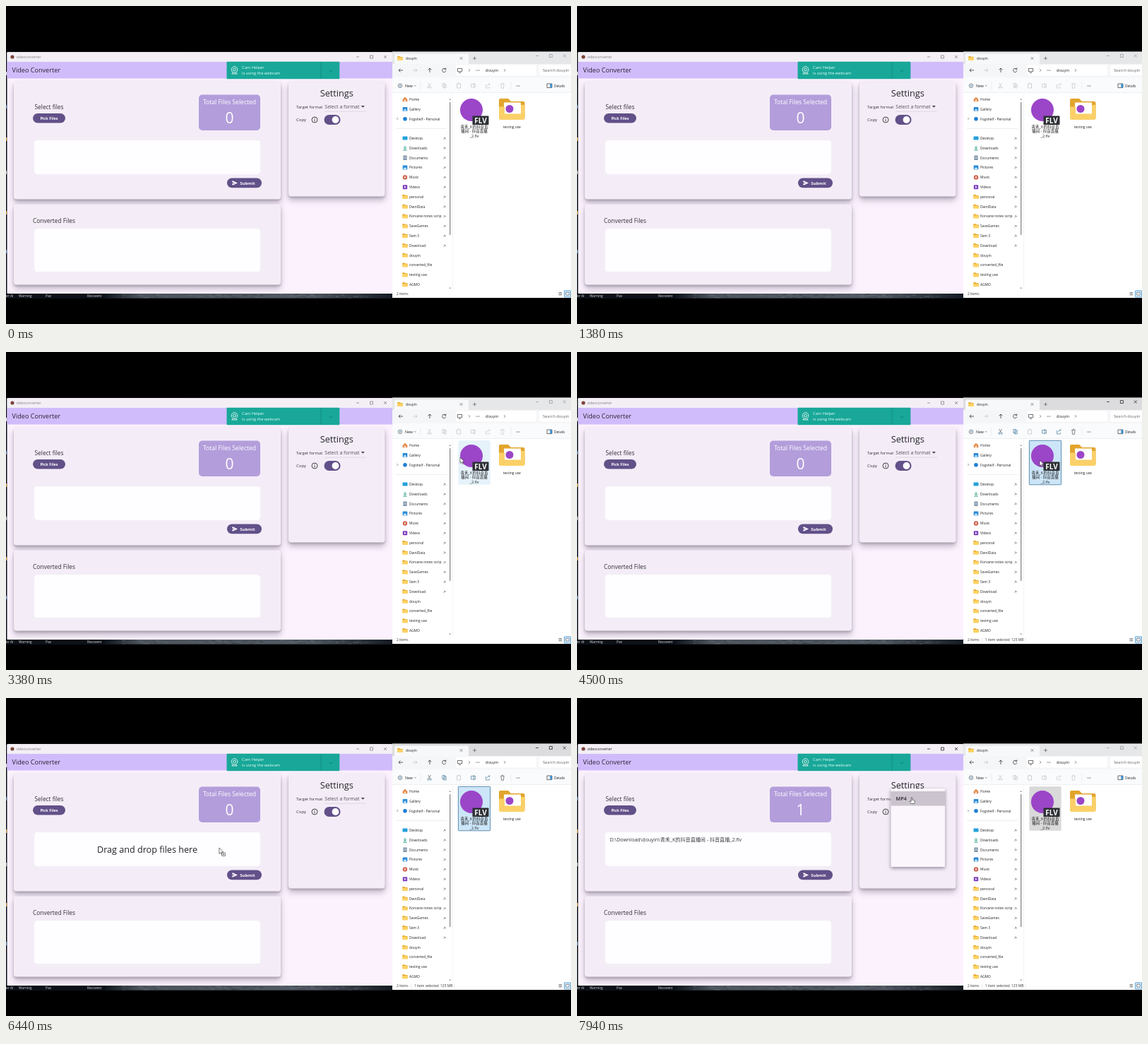
An HTML page for the animation above (8000 ms loop, 800 by 450 pixels).

```html
<!DOCTYPE html>
<html lang="en">
<head>
<meta charset="utf-8">
<title>Video Converter</title>
<style>
html, body { margin: 0; width: 100%; height: 100%; overflow: hidden; background: #000; }
svg { display: block; width: 100vw; height: 100vh; }
text { font-family: 'Open Sans', 'Noto Sans', 'Noto Sans CJK SC', 'Noto Sans CJK JP', 'Noto Sans CJK', sans-serif; white-space: pre; }
.card { filter: drop-shadow(0 2px 1.5px rgba(60, 50, 70, .26)) drop-shadow(0 5px 4px rgba(60, 50, 70, .3)); }
.field { filter: drop-shadow(0 .6px .6px rgba(70, 55, 85, .22)); }
.menu { filter: drop-shadow(0 2px 2.5px rgba(50, 40, 60, .5)); }
</style>
</head>
<body>
<svg id="stage" viewBox="0 0 800 450"></svg>
<script>
const LOOP = 8000;
const CLICK = 3900, DRAG = 4620, ENTER = 5040, DROP = 6820, OPEN = 7620;

const rect = (x, y, w, h, fill, rx = 0, extra = '') =>
  `<rect x="${x}" y="${y}" width="${w}" height="${h}" rx="${rx}" fill="${fill}" ${extra}/>`;
const disc = (x, y, r, fill, extra = '') => `<circle cx="${x}" cy="${y}" r="${r}" fill="${fill}" ${extra}/>`;
const line = (d, stroke, width = .7, extra = '') =>
  `<path d="${d}" fill="none" stroke="${stroke}" stroke-width="${width}" ${extra}/>`;
const shape = (d, fill, extra = '') => `<path d="${d}" fill="${fill}" ${extra}/>`;
const text = (x, y, size, str, fill = '#222', extra = '') =>
  `<text x="${x}" y="${y}" font-size="${size}" fill="${fill}" ${extra}>${str}</text>`;
const group = (id, content, extra = '') => `<g id="${id}" ${extra}>${content}</g>`;
const at = (x, y, content) => `<g transform="translate(${x} ${y})">${content}</g>`;
const MIDDLE = 'text-anchor="middle"', BOLD = 'font-weight="700"';

let seed = 11;
const random = () => (seed = (seed * 16807) % 2147483647) / 2147483647;

function desktop() {
  let out = `<linearGradient id="haze"><stop offset="0" stop-color="#10161d"/><stop offset=".12" stop-color="#4d545d"/>
    <stop offset=".7" stop-color="#525a64"/><stop offset="1" stop-color="#151b22"/></linearGradient>` +
    rect(0, 66, 547, 348, '#0c1118') + rect(140, 407, 407, 6.5, 'url(#haze)');
  for (let i = 0; i < 110; i++) {
    const shade = 45 + random() * 70 | 0;
    out += rect(160 + random() * 350, 407 + random() * 5, 2 + random() * 6, .6 + random(),
      `rgb(${shade},${shade + 6},${shade + 12})`, .3, 'opacity=".6"');
  }
  for (const [y, color] of [[93, '#ddd'], [140, '#4d81b0'], [186, '#d9a23b'], [233, '#aaa'], [290, '#d9a23b'], [345, '#5b8fc0']])
    out += rect(0, y, 1.4, 5, color);
  const labels = [[0, 'er AI'], [18, 'Warning'], [56, 'Pax'], [115, 'Recovent']];
  return out + labels.map(([x, label]) => text(x, 411.8, 4.8, label, '#d8dade')).join('');
}

const windowControls = (x, y, color, gap) => line(
  `M${x - 2} ${y}h4 M${x + gap - 2} ${y - 2}h4v4h-4z M${x + 2 * gap - 2} ${y - 2}l4 4m0 -4l-4 4`, color, .7);

function converter() {
  const card = (x, y, w, h) => rect(x, y, w, h, '#f4edf7', 4, 'class="card"');
  const field = (y, h) => rect(40, y, 320, h, '#fefdff', 4, 'class="field"');
  const pill = (x, y, w) => rect(x, y, w, 13.6, '#625089', 6.8);
  return rect(1.5, 65.3, 545.5, 341.7, '#fcf2fe', 1) +
    rect(1.5, 65.3, 545.5, 13.7, '#f3eff5', 1) +
    disc(9, 72, 2.6, '#7d4339') +
    group('appIdle', text(14.5, 73.8, 5, 'videoconverter', '#85808a') + windowControls(498, 72, '#77727c', 19.5)) +
    group('appActive', text(14.5, 73.8, 5, 'videoconverter', '#222') + windowControls(498, 72, '#111', 19.5)) +
    rect(1.5, 79, 545.5, 23.5, '#d1bcfb') +
    text(8.5, 94.4, 9.1, 'Video Converter', '#292234') +
    rect(312.5, 78.8, 159.8, 24.4, '#18a798', 1) +
    line('M446 79v24', '#10897d', .7) +
    line('M457.8 91l2.2 2 2.2 -2', '#0c766c', .7) +
    disc(323.5, 90, 4.3, 'none', 'stroke="#fff" stroke-width=".8"') +
    disc(323.5, 90, 1.9, 'none', 'stroke="#fff" stroke-width=".8"') +
    line('M321.5 94l-1.8 2h7.6l-1.8 -2', '#fff', .8) +
    text(334, 89.2, 5.75, 'Cam Helper', '#e7fffa') +
    text(334, 97.4, 5.75, 'is using the webcam', '#e7fffa') +
    card(11, 107, 378, 166.5) + card(11, 280.5, 378, 114) + card(400, 107, 136.5, 162.5) +
    text(40.5, 146, 8.4, 'Select files', '#343038') +
    pill(38, 152, 46) + text(61, 161.1, 5.5, 'Pick Files', '#fff', `${MIDDLE} ${BOLD}`) +
    rect(273, 125.5, 87, 50.5, '#b39ddb', 5) +
    text(316.5, 139, 8.6, 'Total Files Selected', '#fff', MIDDLE) +
    text(316.5, 165.5, 21, '0', '#fff', `${MIDDLE} id="count"`) +
    field(189.5, 48.5) + field(315, 61.5) +
    group('hint', text(200, 219, 12.6, 'Drag and drop files here', '#25222a', MIDDLE)) +
    group('path', text(46.5, 203, 7.1, 'D:\\Download\\douyin\\青禾_K的抖音直播间 - 抖音直播_2.flv', '#3b3840')) +
    pill(313, 243.6, 49) + shape('M320.5 247l7.5 3.4 -7.5 3.4v-2.7l4.5 -.7 -4.5 -.7z', '#fff') +
    text(331.3, 252.6, 6, 'Submit', '#fff', BOLD) +
    text(38, 306.8, 8.4, 'Converted Files', '#343038') +
    text(468.3, 127.5, 12.7, 'Settings', '#25222a', MIDDLE) +
    text(411, 144.6, 5.9, 'Target format', '#343038') +
    text(451.3, 145, 7, 'Select a format', '#55505b') +
    shape('M502.7 141h5.2l-2.6 2.7z', '#4c4852') + line('M451 149.2h59', '#cbc4cf', .5) +
    text(411, 163.2, 6, 'Copy', '#343038') +
    disc(437, 161, 4, 'none', 'stroke="#333" stroke-width=".9"') + line('M437 160.4v2.8M437 158.6v1', '#333', .9) +
    rect(450.5, 154, 23, 14, '#625089', 7) + disc(466.5, 161, 4.9, '#fff') +
    group('menu', rect(444.5, 128, 76.5, 111, '#fbf5fc', 1, 'id="sheet" class="menu"') +
      rect(444.5, 132, 76.5, 20.5, '#cbc4ce') + text(451.5, 145, 7.2, 'MP4', '#28242d', 'font-weight="600"'));
}

const folder = (x, y) => at(x, y,
  shape('M-3.7 -2.3q0 -.8 .8 -.8h2.2l1 1h2.7q.8 0 .8 .8v3.6h-7.5z', '#e5a92c') +
  rect(-3.7, -1.3, 7.5, 4.3, '#fdd366', .6));

const sideIcons = {
  home: shape('M-3.3 0L0 -3.2 3.3 0V3.2H-3.3z', '#e58a4a') + rect(-.8, .6, 1.6, 2.6, '#fff'),
  picture: rect(-3.3, -3, 6.6, 6, '#2b8bd8', .8) + shape('M-2.6 2.4L0 -.6 2.6 2.4z', '#d8f0ff'),
  cloud: disc(0, 0, 2.8, '#1d7fd4'),
  desktop: rect(-3.5, -2.8, 7, 5.2, '#24a1dc', .7),
  download: line('M0 -3v4.2M-2 -.6l2 2 2 -2M-2.7 3h5.4', '#259c86', 1),
  document: rect(-2.6, -3.2, 5.2, 6.4, '#7e93a8', .6) + line('M-1.5 -1h3M-1.5 .5h3', '#fff', .6),
  music: disc(0, 0, 3.2, '#d1634d') + disc(0, 0, 1.1, '#fff'),
  video: rect(-3.2, -3, 6.4, 6, '#7f42bd', .8) + shape('M-1 -1.5L1.6 0 -1 1.5z', '#fff'),
};

function sidebar() {
  const quick = [['Desktop', 'desktop'], ['Downloads', 'download'], ['Documents', 'document'], ['Pictures', 'picture'],
    ['Music', 'music'], ['Videos', 'video'], ['personal'], ['DwnlData'], ['Korvane notes scrip'], ['SaveGames'],
    ['Sem 3'], ['Download'], ['douyin'], ['converted_file'], ['testing use'], ['AGMO']];
  const row = (y, label, icon) => (icon ? at(565, y, sideIcons[icon]) : folder(565, y)) + text(571, y + 1.8, 4.95, label);
  const pin = y => line(`M619.5 ${y + 1.8}l1.6 -1.6m-1 -1.4l2.2 2.2m-1.4 -2.4l1.8 1.8`, '#5d6368', .7);
  return row(132, 'Home', 'home') + row(146, 'Gallery', 'picture') + row(159.7, 'Fogshelf - Personal', 'cloud') +
    line('M553.3 158l1.6 1.6 -1.6 1.6', '#555', .6) + line('M552 173.5h72', '#e2e2e2', .6) +
    quick.map(([label, icon], i) => {
      const y = 187.2 + i * 13.8;
      return row(y, label, icon) + (i < 12 ? pin(y) : '');
    }).join('') +
    rect(628, 136, 1.4, 188, '#8f8f8f', .6) + line('M632.5 123v279', '#ececec', .6) +
    shape('M627.2 133l1.5 -2 1.5 2zM627.2 398.5l1.5 2 1.5 -2z', '#999');
}

const toolIcons = enabled => {
  const off = '#c4c7ca', accent = enabled ? '#4d7f9f' : off, ink = enabled ? '#555' : off;
  const ring = x => disc(x, 115.2, 1.1, 'none', `stroke="${accent}" stroke-width=".7"`);
  return line('M597.5 109l3 5M601.5 109l-3 5', ink) + ring(597.8) + ring(601.2) +
    line('M617.9 109.5h3.6v5h-3.6zM619.7 111h3.6v5h-3.6z', accent) +
    line('M638.5 110h5v6h-5zM640 109.2h2', off, .8) +
    line('M658.5 110.5h6v4.5h-6zM662.5 109v7.3', accent) +
    line('M679.5 111v5h5v-2M681 113.5q.5 -3 4 -3m-1.4 -1.6l1.6 1.6 -1.6 1.6', accent) +
    line('M700.3 110.3h5.4M701 110.3l.5 6h3l.5 -6M702 109.2h2', ink);
};

function explorer() {
  const dots = (x, y) => [-2, 0, 2].map(dx => disc(x + dx, y, .6, '#333')).join('');
  const chevron = x => line(`M${x - .8} 89.2l1.7 1.8 -1.7 1.8`, '#444', .6);
  return rect(547, 64.7, 253, 348.3, '#fff') +
    rect(547, 64.7, 253, 18, '#e6e7e9', 0, 'id="tabBar"') +
    rect(550, 67.5, 105, 16, '#f7f8f9', 2) + folder(558, 74) + text(566, 76, 4.95, 'douyin') +
    line('M642.7 72.2l3.6 3.6m0 -3.6l-3.6 3.6M661 74h5m-2.5 -2.5v5', '#444', .6) +
    group('frameIdle', windowControls(752, 70.5, '#8e9296', 19.4)) +
    group('frameActive', windowControls(752, 70.5, '#111', 19.4)) +
    rect(547, 82, 253, 19.5, '#f5f6f7') +
    rect(637, 83.5, 114, 15, '#fff', 2) + rect(755, 83.5, 48, 15, '#fff', 2) +
    line('M562 91h-6m2.4 -2.4l-2.4 2.4 2.4 2.4', '#333', .8) +
    line('M576 91h6m-2.4 -2.4l2.4 2.4 -2.4 2.4', '#c0c3c6', .8) +
    line('M600 94v-6m-2.4 2.4l2.4 -2.4 2.4 2.4', '#333', .8) +
    line('M622.3 89.2a2.7 2.7 0 1 0 .6 2.4M622.8 87.5v2.2h-2.2', '#333', .8) +
    line('M639.3 88.5h6.4v4.2h-6.4zM641 94.4h3', '#333') +
    chevron(656) + dots(668, 91) + text(679, 93, 5.7, 'douyin') + chevron(706) +
    text(760, 93, 5.7, 'Search douyin', '#666') +
    rect(547, 101.5, 253, 21, '#fafbfc') + line('M547 122.5h253', '#e4e6e8', .6) +
    disc(558, 112.8, 2.8, 'none', 'stroke="#444" stroke-width=".6"') + line('M556.5 112.8h3m-1.5 -1.5v3', '#1b78bd', .6) +
    text(565, 114.7, 5.2, 'New') + line('M577.8 112l1.4 1.4 1.4 -1.4', '#555', .6) +
    line('M587 107v11.5M715 107v11.5', '#dedfe0', .5) +
    group('toolsOff', toolIcons(false)) + group('toolsOn', toolIcons(true)) + dots(725, 113) +
    line('M766 110h7v5.6h-7z', '#333') + rect(770.3, 110, 2.7, 5.6, '#3a8fd0') +
    text(776, 114.7, 4.85, 'Details') +
    sidebar() + files() +
    text(553, 409, 4.85, '2 items', '#333') +
    group('status', line('M573.6 404.5v5.5M635 404.5v5.5', '#ccc', .5) +
      text(578, 409, 4.95, '1 item selected', '#333') + text(615, 409, 4.95, '125 MB', '#333')) +
    line('M782.5 405.5h4.5M782.5 407.2h4.5M782.5 408.9h4.5', '#555') +
    rect(790.5, 402.8, 9, 9, '#d6ebfa', .5, 'stroke="#2d86c5" stroke-width=".7"') +
    rect(792.7, 405.2, 4.6, 3.8, '#fff', .3, 'stroke="#345" stroke-width=".6"');
}

function files() {
  const name = ['青禾_K的抖音直', '播间 - 抖音直播', '_2.flv'];
  return rect(640.4, 125.3, 45.2, 62.5, 'none', .8, 'id="selection" stroke-width=".9"') +
    disc(659, 147, 16, '#9b45c8') +
    rect(660.5, 155.5, 23, 12.5, '#2d3035', .5) +
    text(672, 165.6, 10, 'FLV', '#fff', `${MIDDLE} ${BOLD}`) +
    name.map((part, i) => text(663, 172.6 + i * 6.7, 5.5, part, '#222', MIDDLE)).join('') +
    shape('M698 133q0 -2 2 -2h11l4 4h17q2.5 0 2.5 2.5V159h-36.5z', '#e2a52d') +
    rect(705, 136.5, 24, 18, '#fff', 1) +
    shape('M698 142.5h8v10h28.5v6q0 2.5 -2.5 2.5h-31.5q-2.5 0 -2.5 -2.5z', '#fbd068') +
    rect(729, 140, 5.5, 14, '#fbd068') +
    disc(713, 145.5, 5.5, '#9b45c8') +
    text(716.3, 172.6, 4.95, 'testing use', '#222', MIDDLE);
}

const pointer = 'M0 0V8.3l1.9 -1.7 1.3 2.9 1.4 -.6 -1.3 -2.8h2.7z';
const hand = 'M-.8 -4q.8 -.9 1.6 0v3.2l2.6 .6q1 .3 .9 1.4l-.6 3.3h-4.3l-2.6 -3q.3 -1.3 1.6 -.5l.8 .6z';
const outline = 'stroke="#222" stroke-width=".6" stroke-linejoin="round"';
const cursor = group('cursor',
  group('arrow', shape(pointer, '#fff', outline)) +
  group('badge', rect(3.8, 7, 5, 4.5, '#fff', .4, 'stroke="#333" stroke-width=".6"') + line('M5 9.2h2.6m-1.3 -1.3v2.6', '#333', .6)) +
  group('hand', shape(hand, '#fff', outline)));

document.getElementById('stage').innerHTML =
  rect(0, 0, 800, 450, '#000') + desktop() + converter() + explorer() + cursor;

const el = id => document.getElementById(id);
const show = (id, on) => el(id).setAttribute('visibility', on ? 'visible' : 'hidden');
const clamp = v => Math.min(1, Math.max(0, v));
const smooth = v => v * v * (3 - 2 * v);

// time, x, y of the pointer tip
const track = [
  [2750, 690, 290], [3250, 643, 149], [3500, 643, 149], [3850, 655, 153], [DRAG, 655, 153],
  [5300, 341, 218], [5750, 338, 217], [6300, 300, 212], [DROP, 310, 212],
  [7300, 480, 127], [7450, 480, 128], [OPEN, 478, 143], [7900, 474, 145],
];

function pointerAt(t) {
  const next = track.findIndex(step => step[0] > t);
  if (next < 0) return track[track.length - 1].slice(1);
  const [t0, x0, y0] = track[Math.max(0, next - 1)], [t1, x1, y1] = track[next];
  const k = t1 > t0 ? smooth(clamp((t - t0) / (t1 - t0))) : 0;
  return [x0 + (x1 - x0) * k, y0 + (y1 - y0) * k];
}

function render(t) {
  const selected = t >= CLICK, opened = t >= OPEN, dropped = t >= DROP;
  const explorerActive = selected && !opened;
  const hovered = t >= 3220 && !selected;
  show('appIdle', !opened);
  show('appActive', opened);
  show('frameIdle', !explorerActive);
  show('frameActive', explorerActive);
  show('toolsOff', !explorerActive);
  show('toolsOn', explorerActive);
  show('status', selected);
  show('hint', t >= ENTER && !dropped);
  show('path', dropped);
  el('count').textContent = dropped ? '1' : '0';
  el('tabBar').setAttribute('fill', explorerActive ? '#dcdcde' : '#e6e7e9');

  const selection = el('selection');
  selection.setAttribute('fill', opened ? '#d9d9d9' : selected ? '#cce5f8' : hovered ? '#e5f2fa' : 'none');
  selection.setAttribute('stroke', explorerActive ? '#4f83a8' : 'none');

  const grow = clamp((t - OPEN) / 250);
  el('menu').setAttribute('opacity', clamp(grow * 2));
  el('sheet').setAttribute('height', 24.5 + 86.5 * smooth(grow));
  show('menu', opened);

  const [x, y] = pointerAt(t);
  el('cursor').setAttribute('transform', `translate(${x} ${y})`);
  show('arrow', t >= track[0][0] && !opened);
  show('badge', t >= DRAG + 80 && !dropped);
  show('hand', opened);
}

const start = performance.now();
function tick() {
  render((performance.now() - start) % LOOP);
  requestAnimationFrame(tick);
}
tick();
</script>
</body>
</html>
```
